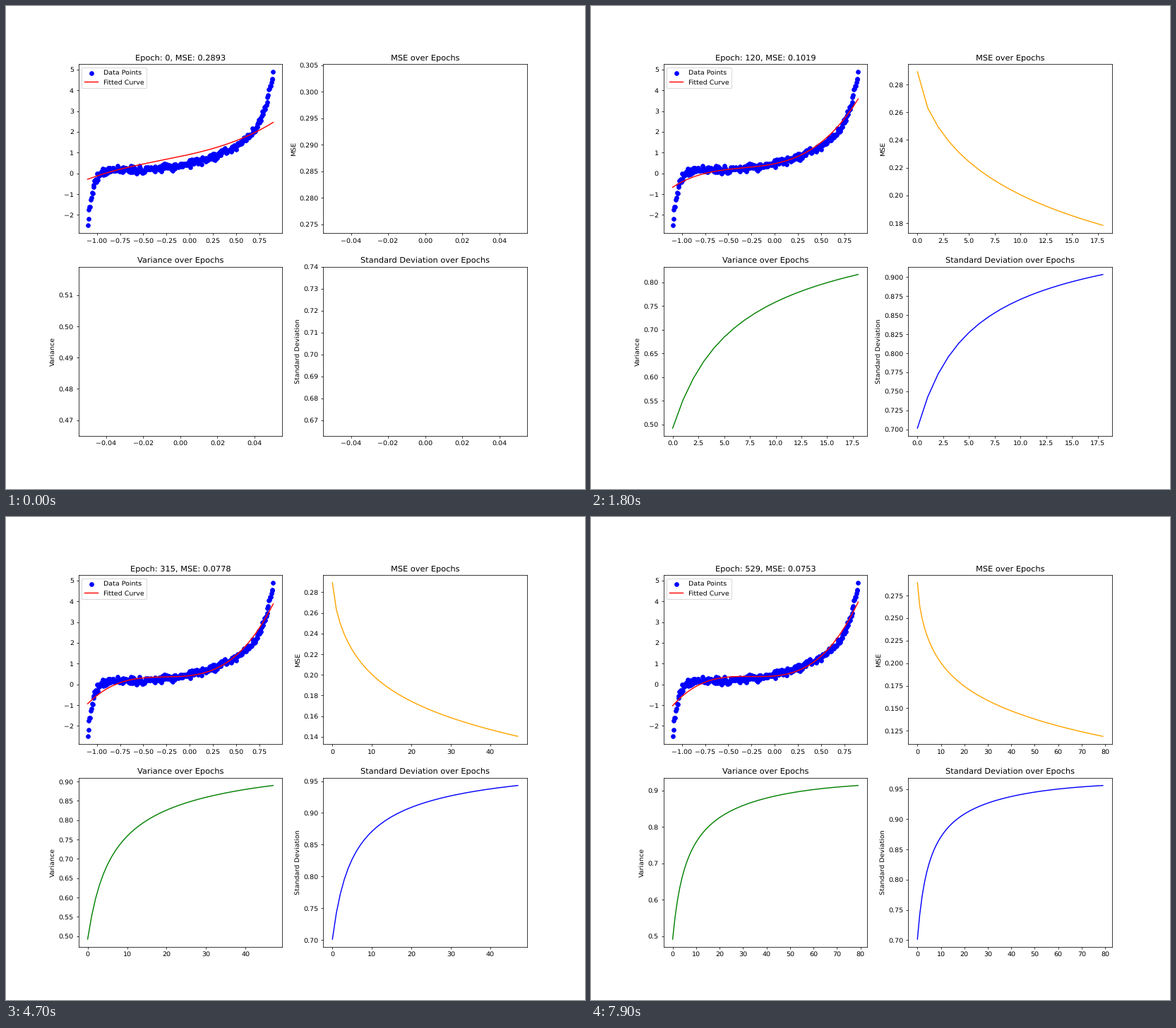
Recreate the animation shown at these times as a matplotlib script. Size 820 px wide and 683 px high, loop 8000 ms.

```python
import numpy as np
import matplotlib.pyplot as plt
from matplotlib.animation import FuncAnimation
from numpy.polynomial.legendre import legval

W, H, DPI = 820, 683, 68.33
FRAMES, INTERVAL = 80, 100
EPOCHS = np.linspace(0, 999, 150, dtype=int)

plt.rcParams["text.hinting"] = "none"


def mse(e):
    """Fast early drop that settles into a plain exponential decay."""
    drop = 0.675 * (1 - np.exp(-0.193 * e ** 0.7))
    return 0.07507 + 0.21423 * np.exp(-0.0117 * e - drop)


def variance(e):
    return (0.9262 - 0.1805 * np.exp(-0.034 * e)
            - 0.162 * np.exp(-0.145 * e) - 0.0917 * np.exp(-0.42 * e))


# Legendre weights of the cubic fit; higher orders learn more slowly
START = np.array([0.907, 1.20, 0.18, 0.17])
FINAL = np.array([0.745, 1.549, 0.725, 0.989])
RATES = np.array([0.64, 0.0725, 0.035, 0.00575])


def fitted(x, e):
    weights = FINAL + (START - FINAL) * np.exp(-RATES * e)
    return legval(x + 0.1, weights)


def make_data(n=300):
    rng = np.random.default_rng(4)
    x = np.linspace(-1.1, 0.9, n)
    y = 0.48 + 1.05 * x + 0.88 * x ** 2
    y += 2.76 * np.exp(9 * (x - 0.9)) - 2.87 * np.exp(-17 * (x + 1.1))
    y += np.clip(rng.normal(0, 0.09, n), -0.2, 0.2)
    y[0], y[-1] = -2.5, 4.9
    return x, np.clip(y, y[0], y[-1])


fig, axes = plt.subplots(2, 2, dpi=DPI,
                         figsize=((W + 0.01) / DPI, (H + 0.01) / DPI))
ax_fit, ax_mse, ax_var, ax_std = axes.flat

x, y = make_data()
ax_fit.scatter(x, y, color="blue", label="Data Points")
fit_line, = ax_fit.plot(x, fitted(x, 0), color="red", label="Fitted Curve")
ax_fit.set_xlim(-1.2, 0.999)
ax_fit.set_ylim(-2.87, 5.27)
ax_fit.legend(loc="upper left")
title = ax_fit.set_title("")

steps = np.arange(FRAMES)
var = variance(steps)
charts = []
for ax, values, color, name, label in (
    (ax_mse, mse(steps), "orange", "MSE", "MSE"),
    (ax_var, var, "green", "Variance", "Variance"),
    (ax_std, np.sqrt(var), "blue", "Standard Deviation", "Standard Deviation"),
):
    line, = ax.plot([], [], color=color)
    ax.set_title(f"{name} over Epochs")
    ax.set_ylabel(label)
    charts.append((ax, line, values))


def update(i):
    epoch = EPOCHS[i]
    fit_line.set_ydata(fitted(x, epoch))
    title.set_text(f"Epoch: {epoch}, MSE: {mse(epoch):.4f}")
    for ax, line, values in charts:
        line.set_data(steps[:i + 1], values[:i + 1])
        ax.relim()
        ax.autoscale_view()
    return [fit_line, title] + [line for _, line, _ in charts]


anim = FuncAnimation(fig, update, frames=FRAMES, interval=INTERVAL,
                     init_func=lambda: update(0), repeat=True,
                     repeat_delay=0, blit=False)
plt.show()
```
